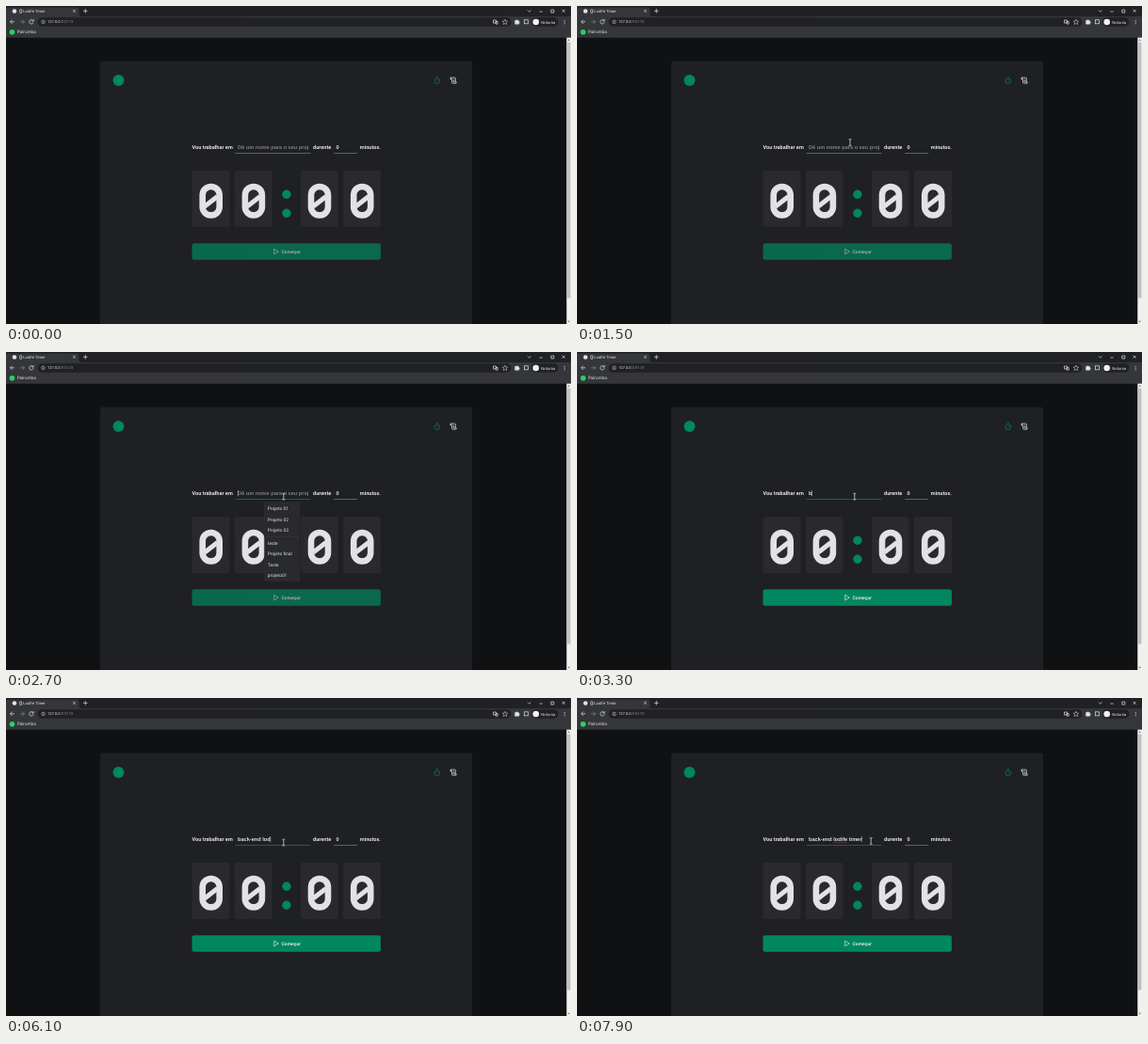
Recreate the animation shown at these times as an HTML page. Size 600 by 338 pixels, loop 8000 ms.

```html
<!DOCTYPE html>
<html lang="pt">
<head>
<meta charset="utf-8">
<title>Timer</title>
<style>
  html, body { margin: 0; width: 100%; height: 100%; overflow: hidden; background: #101113; }
  svg { display: block; width: 600px; height: 338px; }
  text { font-family: Roboto, sans-serif; fill: #e1e1e6; text-rendering: geometricPrecision; white-space: pre; }
  .ui { font-size: 4.2px; }
  .label { font-size: 5.625px; font-weight: 700; }
  .field { font: 700 5.625px "Liberation Sans", Arial, sans-serif; }
  .menu text { font-size: 4.85px; }
  .dim { fill: #7c7c8a; }
  .line { fill: none; stroke: #dfe1e5; stroke-width: .7; }
  .green { fill: #00875f; }
</style>
</head>
<body>
<svg viewBox="0 0 600 338">
  <defs>
    <g id="digit">
      <rect width="40" height="60" rx="2.5" fill="#29292e"/>
      <rect x="11.2" y="17" width="18" height="30.4" rx="8.8" fill="none" stroke="#e1e1e6" stroke-width="6.6"/>
      <path d="M13.5 38 L27 27.5" stroke="#e1e1e6" stroke-width="5"/>
    </g>
  </defs>

  <!-- browser window -->
  <rect width="600" height="34" fill="#202124"/>
  <path d="M0 11V3Q0 1.5 2 1.5H75Q77.500 1.500 77.500 4V9Q77.500 11 80 11H600V33.600H0Z" fill="#35363a"/>
  <rect x="33.500" y="12.300" width="503" height="9.400" rx="4.700" fill="#202124"/>
  <circle cx="9" cy="5.500" r="2.300" fill="#dfe1e5"/>
  <rect x="14.700" y="3.700" width="2" height="3.800" rx=".8" class="line" stroke-width=".5"/>
  <text x="18.300" y="7" class="ui">Lodife Timer</text>
  <g class="line">
    <path d="M71.200 4l2.600 2.600m0-2.600l-2.600 2.600M82 5.300h4.600M84.300 3v4.600"/>
    <path d="M554 4.500l1.700 1.700 1.700-1.700M566.500 6h3.200M578.800 4h3v3h-3zM590.600 3.700l3 3m0-3l-3 3"/>
    <path d="M9 16.800H4.500m2.200-2.200l-2.200 2.200 2.200 2.200"/>
    <path d="M15 16.800h4.500m-2.200-2.200l2.200 2.200-2.200 2.200" opacity=".45"/>
    <path d="M28.700 15.500a2.200 2.200 0 1 0 .4 1.800M29.200 14v2h-2"/>
    <circle cx="39.500" cy="16.900" r="1.800" stroke-width=".5"/>
    <path d="M39.500 16.600v1.300M39.500 15.600v.5" stroke-width=".5"/>
    <path d="M517.500 15h3v3h-3zM520 16.500h2.200v2.600h-2.200z"/>
    <path d="M530 14.200l.8 1.800 2 .2-1.500 1.300.5 2-1.800-1-1.800 1 .5-2-1.500-1.300 2-.2z" stroke-width=".5"/>
    <rect x="550.400" y="14.800" width="4" height="4"/>
  </g>
  <path d="M540.300 15.300h1.300a.9.9 0 0 1 1.800 0h1.300v1.300a.9.9 0 0 1 0 1.800v1h-4.400z" fill="#dfe1e5"/>
  <text x="44" y="18.400" style="font-size:4.100px">127.0.0.1<tspan fill="#8c9096">:5173</tspan></text>
  <rect x="558" y="12.300" width="28.500" height="9.400" rx="4.700" fill="#202124"/>
  <circle cx="562.700" cy="17" r="3.300" fill="#f1f3f4"/>
  <text x="568.300" y="18.500" class="ui">Noturna</text>
  <path d="M593.200 15v4.400" stroke="#dfe1e5" stroke-width=".9" stroke-dasharray=".9 .8"/>
  <circle cx="6.500" cy="27.700" r="2.800" fill="#25d366"/>
  <text x="11.700" y="29.400" style="font-size:4.700px">Palrumba</text>
  <rect x="595.300" y="33.600" width="4.700" height="304.400" fill="#f1f1f1"/>
  <rect x="595.900" y="38.500" width="3.500" height="272" fill="#c1c1c1"/>
  <path d="M596.500 36.800l1.150-1.500 1.150 1.500zM596.500 334.800l1.150 1.500 1.150-1.500z" fill="#505050"/>

  <!-- page -->
  <rect x="100" y="58.500" width="395" height="290" rx="2.500" fill="#1f2023"/>
  <circle cx="119.500" cy="79" r="6" class="green"/>
  <g class="line" style="stroke:#00875f">
    <circle cx="457.800" cy="79.800" r="2.800"/>
    <path d="M456.700 75.500h2.200M457.800 79.800l1.300-1.300"/>
    <rect id="outline" x="450.200" y="70.700" width="15.500" height="17.300"/>
  </g>
  <path class="line" d="M472.300 78.200v-1.300a.8.800 0 0 1 .8-.8h3.500a.8.800 0 0 1 .8.800v4.100M473.100 76.100a1 1 0 0 0-1.100 1.600h1.500v3.500a1 1 0 0 0 1 1h3.500q.7-.4.200-1.400h-3.600M474.600 78h1.800M474.600 79.500h1.800"/>

  <g class="label">
    <text x="197.500" y="152.400">Vou trabalhar em</text>
    <text x="326" y="152.400">durente</text>
    <text x="375.800" y="152.400">minutos.</text>
  </g>
  <rect id="rule" x="243.500" y="156.300" width="80" height=".7"/>
  <rect x="348.200" y="156.300" width="25" height=".7" fill="#7c7c8a"/>
  <text x="350.500" y="152" class="field">0</text>
  <text id="hint" x="246" y="152" class="field dim">Dê um nome para o seu proj</text>
  <text id="entry" x="246" y="152" class="field"></text>
  <path id="squiggle" d="M272.300 154l.8-.7.8.7.8-.7.8.7.8-.7.8.7.8-.7.8.7.8-.7.8.7.8-.7.8.7.8-.7.8.7.8-.7.8.7.8-.7.8.7" fill="none" stroke="#e5484d" stroke-width=".4"/>
  <rect id="caret" y="147" width=".5" height="6.300" fill="#e1e1e6"/>

  <use href="#digit" x="197.500" y="175"/>
  <use href="#digit" x="242.700" y="175"/>
  <use href="#digit" x="312.800" y="175"/>
  <use href="#digit" x="358" y="175"/>
  <circle cx="297.900" cy="200.300" r="4.700" class="green"/>
  <circle cx="297.900" cy="220.300" r="4.700" class="green"/>

  <g id="button">
    <rect x="197.500" y="252.300" width="200.400" height="17.500" rx="2.500" class="green"/>
    <path d="M284.700 258.200v5.600l4.600-2.800z" class="line" stroke-linejoin="round"/>
    <text x="292.600" y="262.800" style="font-size:5px;font-weight:700">Começar</text>
  </g>

  <g id="menu" class="menu">
    <rect x="274.300" y="159.800" width="37.400" height="83.500" rx=".8" fill="#292a2d" stroke="#3a3b3f" stroke-width=".3"/>
    <path d="M274.300 196.500h37.400" stroke="#424347" stroke-width=".4"/>
    <text x="277.800" y="168.400">Projeto 01</text>
    <text x="277.800" y="179.600">Projeto 02</text>
    <text x="277.800" y="190.800">Projeto 03</text>
    <text x="277.800" y="205">teste</text>
    <text x="277.800" y="216.200">Projeto final</text>
    <text x="277.800" y="227.500">Teste</text>
    <text x="277.800" y="238.700">projeto01</text>
  </g>

  <path id="arrow" d="M0 0v5.500l1.300-1.200.9 2 .9-.4-.9-1.900h1.700z" fill="#111" stroke="#fff" stroke-width=".4"/>
  <path id="beam" d="M-1.400-3.300h1l.4.300.4-.3h1M-1.400 3.300h1l.4-.3.4.3h1M0-3V3" fill="none" stroke="#f4f4f4" stroke-width=".7"/>
</svg>
<script>
  const $ = id => document.getElementById(id);
  const show = (id, on) => $(id).setAttribute("visibility", on ? "visible" : "hidden");

  const phrase = "back-end lodife timer";
  // moment of each keystroke, in tenths of a second
  const keys = [33, 35, 36, 38, 40, 43, 45, 46, 49, 53, 57, 61, 63, 65, 66, 68, 69, 70, 72, 73, 74];
  // pointer path: tenths of a second, x, y
  const path = [[0, -9, 60], [9, -5, 90], [14, 289, 144], [15, 290, 145], [18, 290.5, 151],
    [19, 290.5, 151.6], [20, 290.5, 151.6], [22, 294.8, 153.6], [76, 294.8, 153.6],
    [77, 295.3, 153.4], [78, 295.3, 153.4], [79, 312.2, 152]];

  function pointer(t) {
    const i = path.findIndex(p => p[0] >= t);
    if (i < 1) return path[0].slice(1);
    const a = path[i - 1], b = path[i], k = (t - a[0]) / (b[0] - a[0]);
    return [1, 2].map(n => a[n] + (b[n] - a[n]) * k);
  }

  function draw(now) {
    const t = Math.floor(now % 8000 / 100);
    const typed = keys.filter(k => k <= t).length;
    const focused = t >= 27;

    $("entry").textContent = phrase.slice(0, typed);
    $("caret").setAttribute("x", 246 + (typed ? $("entry").getComputedTextLength() : 0));
    show("caret", focused && (t < 30 || typed));
    show("hint", !typed);
    show("squiggle", t >= 68);
    show("outline", t >= 25 && !focused);
    show("menu", focused && !typed);
    $("rule").setAttribute("fill", focused ? "#00875f" : "#7c7c8a");
    $("button").setAttribute("opacity", typed ? 1 : 0.7);

    const [x, y] = pointer(t);
    const overText = x > 243;
    show("beam", overText);
    show("arrow", !overText);
    $(overText ? "beam" : "arrow").setAttribute("transform", `translate(${x} ${y})`);
    requestAnimationFrame(draw);
  }
  requestAnimationFrame(draw);
</script>
</body>
</html>
```
